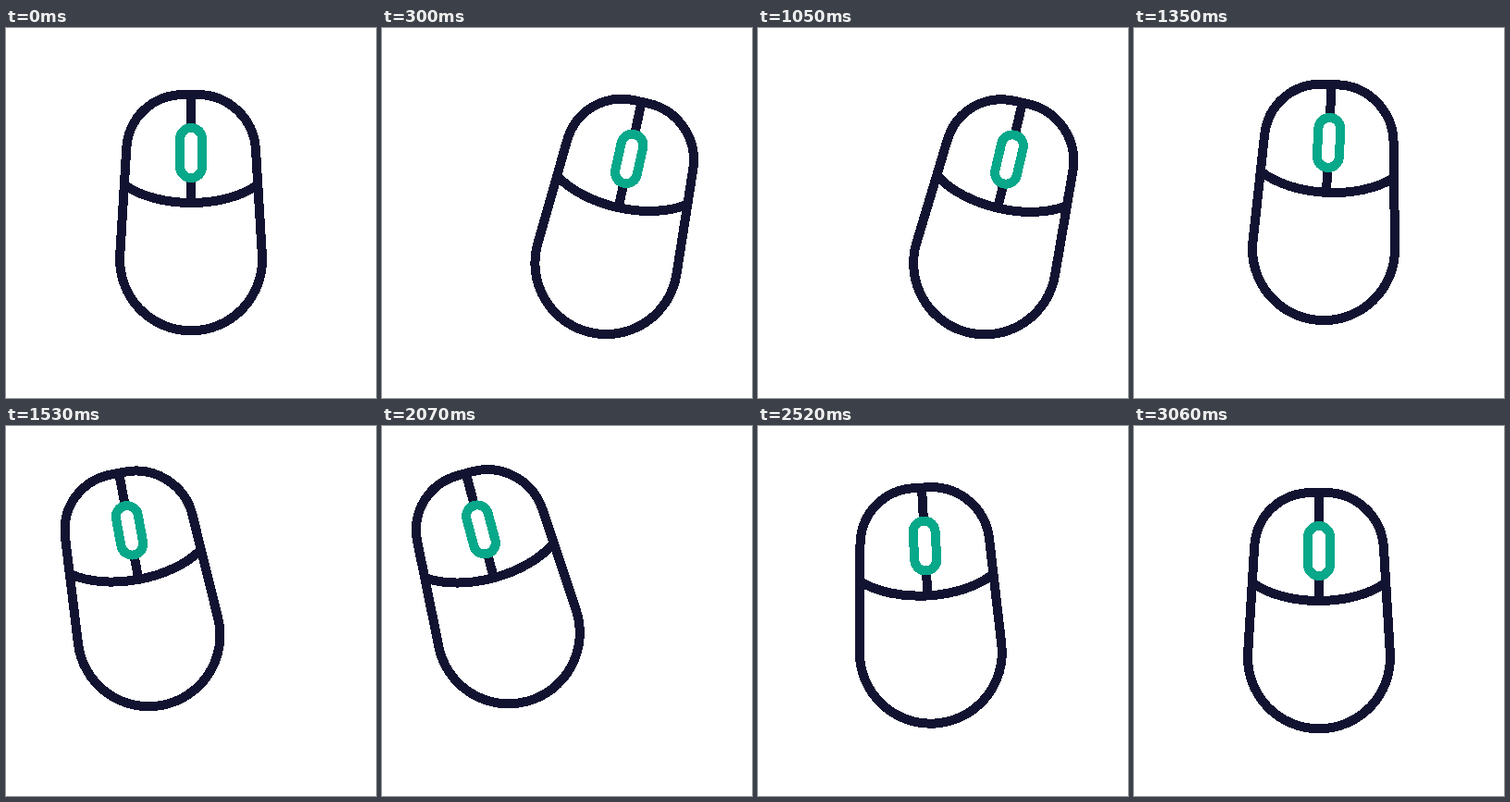
Recreate the animation shown at these times as an HTML page. Size 400 by 400 pixels, loop 3.09 s.

```html
<!DOCTYPE html>
<html lang="en">
<head>
<meta charset="utf-8">
<title>Computer mouse</title>
<style>
  html, body { margin: 0; width: 100%; height: 100%; overflow: hidden; background: #fff; }
  svg { display: block; width: 100%; height: 100%; }
</style>
</head>
<body>
<svg viewBox="0 0 400 400" shape-rendering="crispEdges">
  <g id="mouse" fill="none" stroke="#121331" stroke-width="10" stroke-linecap="round" stroke-linejoin="round">
    <path d="M200 72H207A63 63 0 0 1 269.9 131.3L276.9 246.4A77 77 0 1 1 123.1 246.4L127.9 168"/>
    <path id="button"/>
    <path d="M128.5 170C146 182 172 189 200 189S254 182 271.5 170M200 72V188"/>
    <rect x="188" y="108" width="24" height="54" rx="12" fill="#fff" stroke="#08a88a"/>
  </g>
</svg>
<script>
const LOOP = 3090;
const mouse = document.getElementById('mouse');
const button = document.getElementById('button');

// Poses: x, y, angle
const centre = [0, 0, 0], right = [45, 4, 13.2], left = [-63, -27, -15];

// lift bows the path upwards between its two ends
const moves = [
  { start: 0, end: 495, from: centre, to: right, lift: 0, ease: bezier(.17, .1, 0, 1) },
  { start: 1140, end: 1710, from: right, to: left, lift: 4, ease: bezier(.33, 0, .53, 1) },
  { start: 2220, end: 2765, from: left, to: centre, lift: 0, ease: bezier(.33, 0, .32, 1) }
];
const clicks = [[575, 1050], [1710, 2070], [2765, 3060]];

function bezier(x1, y1, x2, y2) {
  const at = (a, b, t) => 3 * a * t * (1 - t) ** 2 + 3 * b * t * t * (1 - t) + t ** 3;
  return x => {
    if (x <= 0 || x >= 1) return x <= 0 ? 0 : 1;
    let lo = 0, hi = 1;
    for (let i = 0; i < 24; i++) {
      const mid = (lo + hi) / 2;
      if (at(x1, x2, mid) < x) lo = mid; else hi = mid;
    }
    return at(y1, y2, lo);
  };
}

function pose(t) {
  const m = moves.filter(m => m.start <= t).pop();
  const p = m.ease((t - m.start) / (m.end - m.start));
  const [x, y, a] = m.from.map((v, i) => v + (m.to[i] - v) * p);
  return [x, y - m.lift * 4 * p * (1 - p), a];
}

function pressure(t) {
  const c = clicks.find(([a, b]) => t > a && t < b);
  return c ? (1 - Math.cos(2 * Math.PI * (t - c[0]) / (c[1] - c[0]))) / 2 : 0;
}

function draw(now) {
  const t = now % LOOP;
  const [x, y, a] = pose(t);
  const k = pressure(t);
  mouse.setAttribute('transform', `translate(${x} ${y}) rotate(${a} 200 251)`);
  button.setAttribute('d', `M127.9 168L${130.1 + 5 * k} ${131.3 + 2 * k}` +
    `C${131.9 + 8 * k} ${96.7 + 6 * k} ${158.2 + 8 * k} ${72 + 6 * k} ${193 + k} ${72 + 3 * k}L200 72`);
}

const began = performance.now();
function frame() {
  draw(performance.now() - began);
  requestAnimationFrame(frame);
}
frame();
</script>
</body>
</html>
```
